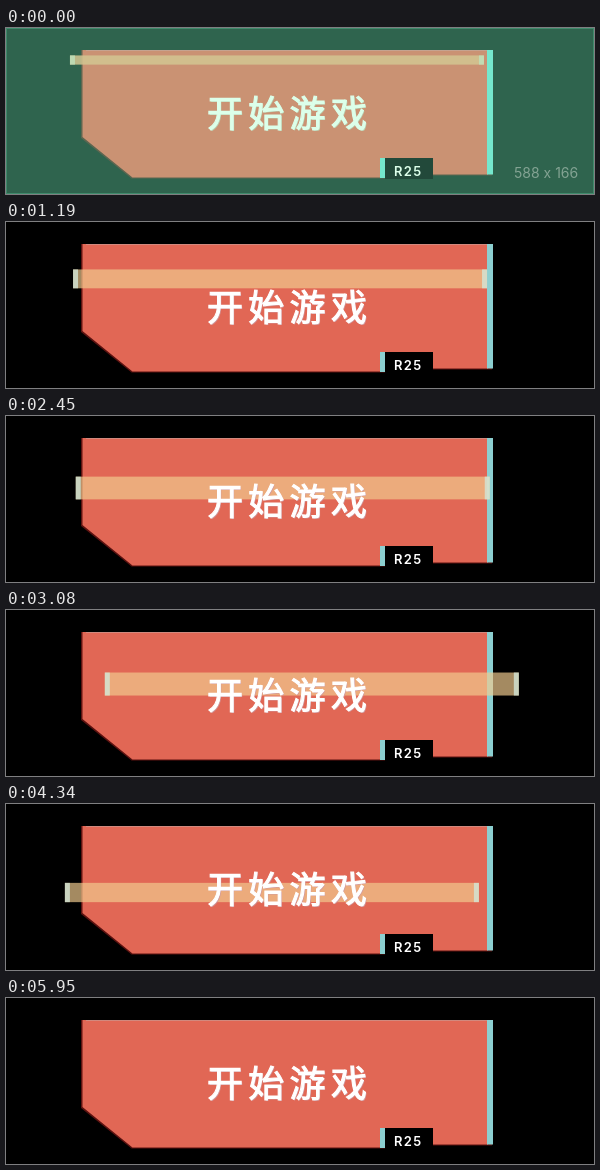
Recreate the animation shown at these times as an HTML page. Size 588 by 166 pixels, loop 6.02 s.

```html
<!DOCTYPE html>
<html lang="zh">
<head>
<meta charset="utf-8">
<style>
  html, body { margin: 0; width: 100%; height: 100%; overflow: hidden; background: #000; }
  svg {
    display: block;
    --back: #000; --face: #e16755; --edge: #5c1210; --cyan: #8ccfd0;
    --text: #fff; --shade: #cf9aa0; --tag: #000;
    --band: #f2cc90; --alpha: .68; --cap: #d3e6d8;
  }
  svg.flash {
    --back: #2f644e; --face: #ca9273; --edge: #5d6650; --cyan: #75e8cd;
    --text: #dcffea; --shade: #b9cfb0; --tag: #22493a;
    --band: #d3c692; --alpha: .85; --cap: #bde3bd;
  }
  .flashOnly { visibility: hidden; }
  .flash .flashOnly { visibility: visible; }
  .label { font: 400 36px "Noto Sans CJK SC", "Noto Sans CJK", sans-serif; letter-spacing: 5.3px; }
  .tag { font: 600 13px Inter, sans-serif; letter-spacing: 1.3px; }
  .size { font: 14px Inter, sans-serif; }
</style>
</head>
<body>
<svg id="stage" width="588" height="166" viewBox="0 0 588 166">
  <rect width="588" height="166" fill="var(--back)"/>
  <path d="M75 22H486V147.500H427V150.500H125.500L75 110Z" fill="var(--edge)"/>
  <path d="M76.500 22H482V146.500H427V149.500H126.500L76.500 109Z" fill="var(--face)"/>
  <path d="M80 22.500H481" stroke="#bbb" stroke-opacity=".4"/>
  <rect x="481" y="22" width="6" height="124.500" fill="var(--cyan)"/>
  <rect x="379" y="130" width="48" height="21" fill="var(--tag)"/>
  <rect x="374" y="130" width="5" height="20" fill="var(--cyan)"/>
  <g id="band">
    <rect width="414" fill="var(--band)" fill-opacity="var(--alpha)"/>
    <rect width="5" fill="var(--cap)" fill-opacity=".8"/>
    <rect x="409" width="5" fill="var(--cap)" fill-opacity=".8"/>
  </g>
  <g class="label">
    <text x="202" y="99.500" fill="var(--shade)">开始游戏</text>
    <text x="201" y="98.700" fill="var(--text)" stroke="var(--text)" stroke-width="1.100">开始游戏</text>
  </g>
  <text class="tag" x="388" y="148" fill="var(--text)">R25</text>
  <g class="flashOnly">
    <text class="size" x="508" y="150" fill="#83a393">588 x 166</text>
    <rect x=".5" y=".5" width="587" height="165" fill="none" stroke="#3f8a6b"/>
  </g>
</svg>
<script>
const LOOP = 6020, END = 5670, WIDEST = 3100;
const stage = document.getElementById('stage');
const band = document.getElementById('band');

// time and vertical centre of the band
const path = [[0, 32], [1820, 70], [3080, 74], [3920, 101], [4830, 74], [END, 19]];

function centre(t) {
  const i = path.findIndex(([time]) => time > t);
  const [t0, y0] = path[i - 1], [t1, y1] = path[i];
  return y0 + (y1 - y0) * (t - t0) / (t1 - t0);
}

// the band swells, then closes
function thickness(t) {
  const span = t < WIDEST ? 3800 : END - WIDEST;
  return 23 * (1 - Math.abs((t - WIDEST) / span) ** 2.5);
}

// a sideways shake, strongest in the middle of the loop
function shift(t) {
  const burst = Math.exp(-(((t - 3550) / 850) ** 2));
  return 67 + 15 * burst + (6 + 20 * burst) * Math.cos(2 * Math.PI * (t - 3080) / 840);
}

const start = performance.now();
function draw(now) {
  const t = Math.max(0, now - start) % LOOP;
  const open = t < END;
  stage.classList.toggle('flash', t < 70);
  band.style.display = open ? '' : 'none';
  if (open) {
    const height = thickness(t);
    band.setAttribute('transform', `translate(${shift(t)} ${centre(t) - height / 2})`);
    for (const part of band.children) part.setAttribute('height', height);
  }
  requestAnimationFrame(draw);
}
draw(start);
</script>
</body>
</html>
```
